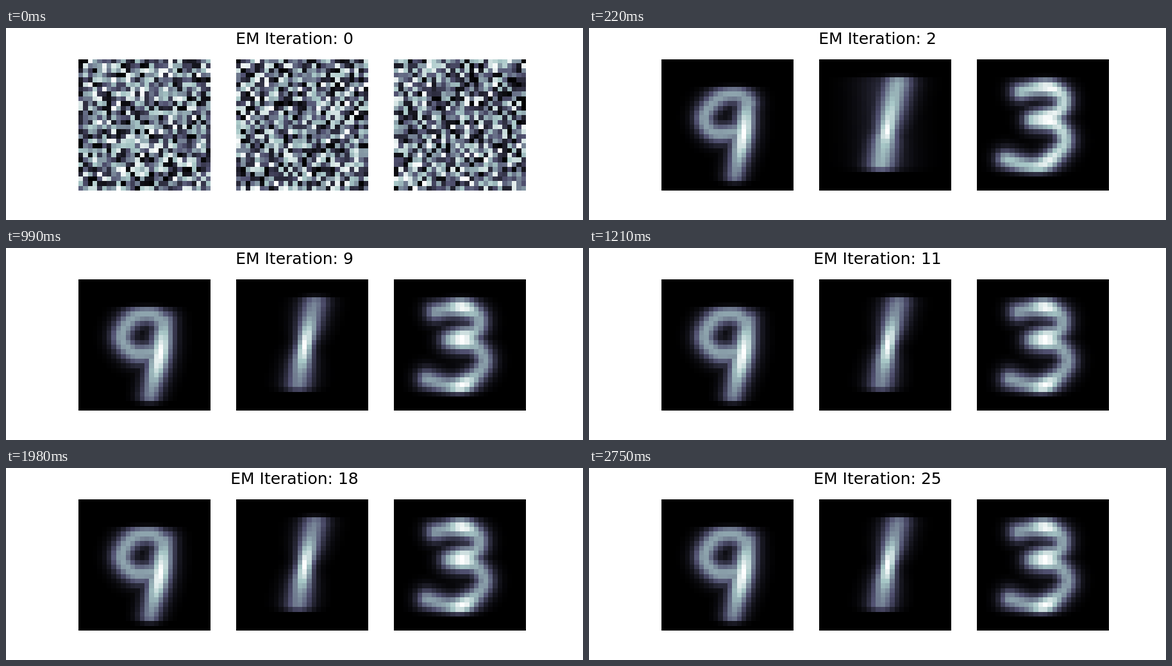
These frames come from a looping animation (900 px wide and 300 px high, 2.86 s). An HTML page with a canvas:

```html
<!DOCTYPE html>
<html lang="en">
<head>
<meta charset="utf-8">
<title>EM Iteration</title>
<style>
  html, body { margin: 0; width: 100%; height: 100%; overflow: hidden; background: #fff; }
  canvas, svg { position: absolute; left: 0; top: 0; width: 900px; height: 300px; }
  text { font: 25px "DejaVu Sans", sans-serif; text-anchor: middle; fill: #000; }
</style>
</head>
<body>
<canvas id="stage" width="900" height="300"></canvas>
<svg viewBox="0 0 900 300"><text id="title" x="450" y="25">EM Iteration: 0</text></svg>
<script>
const N = 28, STEP = 110, COUNT = 26;
const LEFT = 113, PITCH = 246, TOP = 48, SIZE = 206;
const ctx = document.getElementById('stage').getContext('2d');
const title = document.getElementById('title');

const mix = (a, b, t) => a + (b - a) * t;
const edge = v => 1 / (1 + Math.exp(-4 * v));
const bell = (v, center, spread) => Math.exp(-(((v - center) / spread) ** 2));

// Samples a Catmull-Rom curve; "bump" picks out its bright, narrow stretch.
function stroke(path, { lean = 0, base, wide, narrow = wide, bump = () => 0 }) {
  const keys = path.map(([x, y]) => [x + lean * (12 - y), y]);
  const at = i => keys[Math.max(0, Math.min(keys.length - 1, i))];
  const out = [], steps = 16;
  for (let i = 0; i < keys.length - 1; i++) {
    const [p, a, b, q] = [at(i - 1), at(i), at(i + 1), at(i + 2)];
    for (let s = 0; s <= steps; s++) {
      const t = s / steps;
      const [x, y] = [0, 1].map(k => a[k] + .5 * t * (b[k] - p[k] +
        t * (2 * p[k] - 5 * a[k] + 4 * b[k] - q[k] + t * (3 * (a[k] - b[k]) + q[k] - p[k]))));
      const peak = bump(x, y);
      out.push({ x, y, level: mix(base, 1, peak), width: mix(wide, narrow, peak) });
    }
  }
  return out;
}

// Digits in cell units; t = 1 is the first estimate, t = 0 the settled one.
const nine = t => ({ top: 5.9, bottom: 26.4, samples: [
  ...stroke([[17, 15.4], [12, 15.8], [9.1, 12.4], [11.5, 8.3], [15.5, 7.5], [18, 9.5]],
    { lean: .3 * t, base: .64, wide: 1.5 - .2 * t }),
  ...stroke([[18.3, 9], [17.3, 16], [15.2, 24.8]],
    { lean: -.05 * t, base: .48, wide: 1.5 - .15 * t, bump: (x, y) => bell(y, 16, 6) })
] });

const one = t => ({ top: 3.9, bottom: 23.7, samples: [
  ...stroke([[16.7, 4.8], [14.6, 14], [13.2, 22.4]],
    { base: mix(.52, .73, t), wide: mix(1.9, 2.3, t), narrow: 1.15,
      bump: (x, y) => bell(y, 14 + 1.6 * t, mix(4.5, 1.2, t)) }),
  ...stroke([[13.3, 5], [14, 22]], { base: .24 * t, wide: 4 })
] });

const three = t => ({ top: 3.9, bottom: 24.5, samples:
  stroke([[8.8, 7], [14.3, 6], [18, 8.3], [16.8, 11.6], [11.8, 13], [16.8, 13.8],
    [19.2, 18], [14, 22.8], [7, 21.3]],
    { lean: .14 * t, base: mix(.62, .8, t), wide: 1.4 - .15 * t,
      bump: x => bell(x, 14.5 + 2 * t, 2.2) })
});

function render({ top, bottom, samples }) {
  return Array.from({ length: N * N }, (_, i) => {
    const cx = i % N + .5, cy = Math.floor(i / N) + .5;
    const light = Math.max(...samples.map(({ x, y, level, width }) => {
      const q = ((cx - x) ** 2 + (cy - y) ** 2) / width ** 2;
      return level * (.82 * Math.exp(-q / 2) + .18 * Math.exp(-q / 8));
    }));
    return Math.max(0, light * edge(cy - top) * edge(bottom - cy) - .015);
  });
}

function noise(seed) {
  return Array.from({ length: N * N }, () => {
    seed = seed + 0x6D2B79F5 | 0;
    let t = Math.imul(seed ^ seed >>> 15, 1 | seed);
    t = t + Math.imul(t ^ t >>> 7, 61 | t) ^ t;
    return (((t ^ t >>> 14) >>> 0) / 2 ** 32) ** 1.2;
  });
}

// The "bone" colour map: each channel is linear between its bends.
const ramp = (v, ...bends) => {
  let [x0, y0] = [0, 0];
  for (const [x, y] of [...bends, [1, 1]]) {
    if (v <= x) return 255 * mix(y0, y, (v - x0) / (x - x0));
    [x0, y0] = [x, y];
  }
};
const bone = v => `rgb(${[
  ramp(v, [.746, .653]),
  ramp(v, [.365, .319], [.746, .778]),
  ramp(v, [.365, .444])
].map(Math.round)})`;

function drawPanel(left, values) {
  const max = Math.max(...values);
  const snap = n => Math.ceil(n * SIZE / N - .5);
  values.forEach((v, i) => {
    const c = i % N, r = Math.floor(i / N);
    ctx.fillStyle = bone(v / max);
    ctx.fillRect(left + snap(c), TOP + snap(r), snap(c + 1) - snap(c), snap(r + 1) - snap(r));
  });
}

const panels = [nine, one, three].map((digit, i) => ({
  left: LEFT + i * PITCH,
  start: noise(7 + 12 * i),
  first: render(digit(1)),
  settled: render(digit(0))
}));

// The panels are cut off one pixel below the top of their cells.
ctx.rect(0, TOP + 1, 900, SIZE - 1);
ctx.clip();

function draw(k) {
  title.textContent = `EM Iteration: ${k}`;
  const rest = k < 12 ? Math.exp(-.55 * (k - 1)) : 0;
  for (const { left, start, first, settled } of panels)
    drawPanel(left, k ? settled.map((v, i) => mix(v, first[i], rest)) : start);
}

let shown = -1;
const origin = performance.now();
function tick() {
  const k = Math.floor((performance.now() - origin) / STEP) % COUNT;
  if (k !== shown) draw(shown = k);
  requestAnimationFrame(tick);
}
tick();
</script>
</body>
</html>
```
